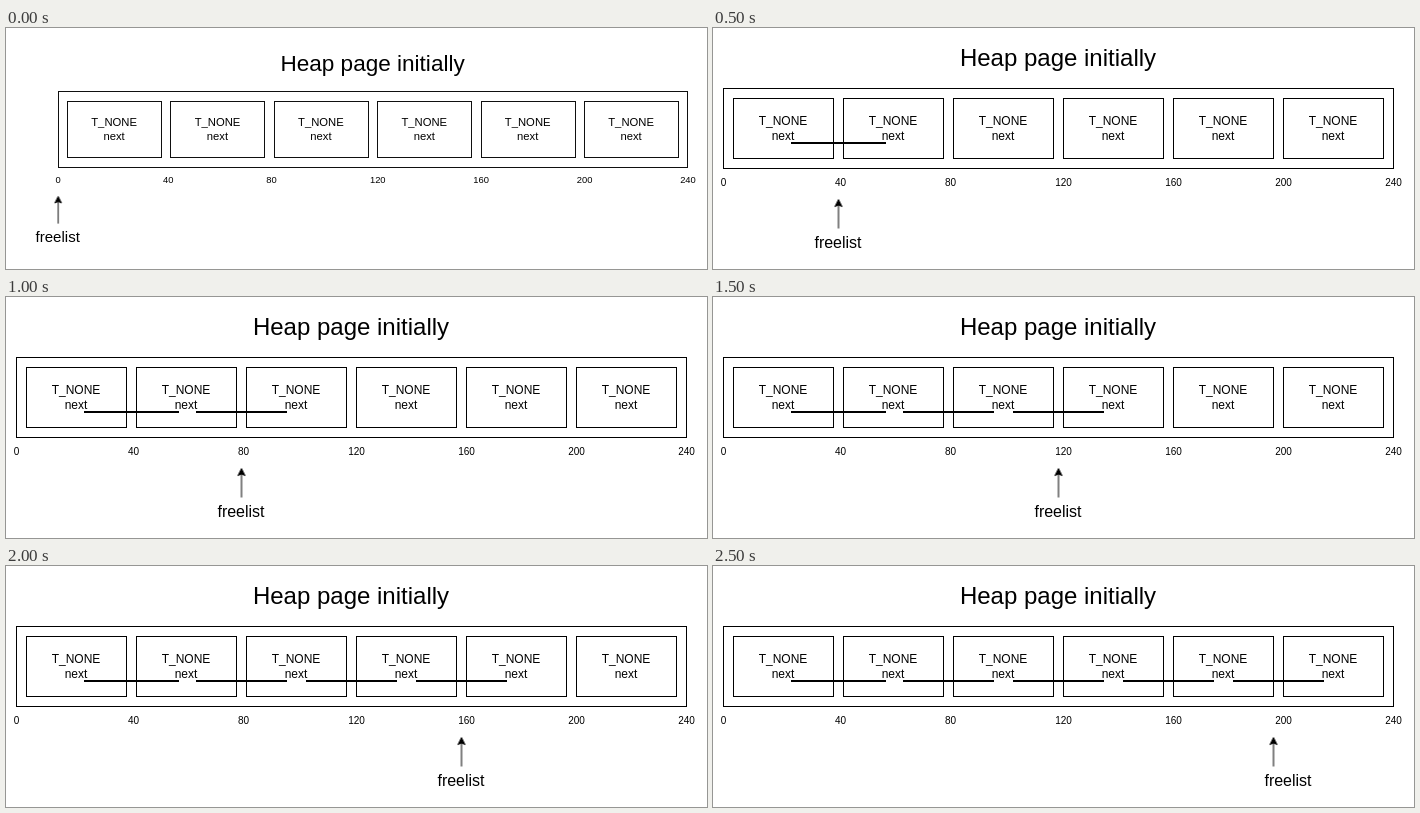
Recreate the animation shown at these times as an HTML page. Size 701 px wide and 241 px high, loop 3 s.

```html
<!DOCTYPE html>
<html lang="en">
<head>
<meta charset="utf-8">
<title>Heap page freelist</title>
<style>
  html, body { margin: 0; width: 100%; height: 100%; overflow: hidden; background: #fff; }
  svg { display: block; }
  text { font-family: "Liberation Sans", Arial, Helvetica, sans-serif; text-anchor: middle; }
  .box { fill: none; stroke: #000; shape-rendering: crispEdges; }
  .link { stroke: #000; stroke-width: 2; visibility: hidden; }
  .link, .page, .arrow, .label { animation: 3s step-end infinite; }

  .page { animation-name: page; }
  .arrow { animation-name: arrow; }
  .label { animation-name: label; }

  /* The first step shows the whole diagram slightly smaller. */
  @keyframes page {
    0% { transform: translate(42.3px, 7.1px) scale(.94); }
    16.666%, 100% { transform: none; }
  }
  @keyframes arrow {
    0% { transform: translateX(10.5px); }
    16.666% { transform: translateX(125.5px); }
    33.333% { transform: translateX(235.5px); }
    50% { transform: translateX(345.5px); }
    66.666% { transform: translateX(455.5px); }
    83.333%, 100% { transform: translateX(560.5px); }
  }
  @keyframes label {
    0% { transform: translateX(10px); }
    16.666% { transform: translateX(125px); }
    33.333% { transform: translateX(235px); }
    50% { transform: translateX(345px); }
    66.666% { transform: translateX(455px); }
    83.333%, 100% { transform: translateX(575px); }
  }
  @keyframes link1 { 16.666%, 100% { visibility: visible; } }
  @keyframes link2 { 33.333%, 100% { visibility: visible; } }
  @keyframes link3 { 50%, 100% { visibility: visible; } }
  @keyframes link4 { 66.666%, 100% { visibility: visible; } }
  @keyframes link5 { 83.333%, 100% { visibility: visible; } }
</style>
</head>
<body>
<svg width="701" height="241" viewBox="0 0 701 241">
  <defs>
    <g id="slot">
      <rect class="box" x="20.5" y="70.5" width="100" height="60"/>
      <text x="70" y="97" font-size="12">T_NONE</text>
      <text x="70" y="111.6" font-size="12">next</text>
    </g>
  </defs>
  <g class="page">
    <text x="345" y="38" font-size="24">Heap page initially</text>
    <rect class="box" x="10.5" y="60.5" width="670" height="80"/>
    <use href="#slot"/>
    <use href="#slot" x="110"/>
    <use href="#slot" x="220"/>
    <use href="#slot" x="330"/>
    <use href="#slot" x="440"/>
    <use href="#slot" x="550"/>
    <g font-size="10">
      <text x="10.5" y="157.5">0</text>
      <text x="127.5" y="157.5">40</text>
      <text x="237.5" y="157.5">80</text>
      <text x="350.5" y="157.5">120</text>
      <text x="460.5" y="157.5">160</text>
      <text x="570.5" y="157.5">200</text>
      <text x="680.5" y="157.5">240</text>
    </g>
    <path class="link" style="animation-name: link1" d="M78 115H173"/>
    <path class="link" style="animation-name: link2" d="M190 115H281"/>
    <path class="link" style="animation-name: link3" d="M300 115H391"/>
    <path class="link" style="animation-name: link4" d="M410 115H501"/>
    <path class="link" style="animation-name: link5" d="M520 115H611"/>
    <g class="arrow" stroke="#000">
      <path d="M0 200.5V177"/>
      <path d="M0 171.6L3.5 178.6L0 176.9L-3.5 178.6Z"/>
    </g>
    <text class="label" y="220" font-size="16">freelist</text>
  </g>
</svg>
</body>
</html>
```
